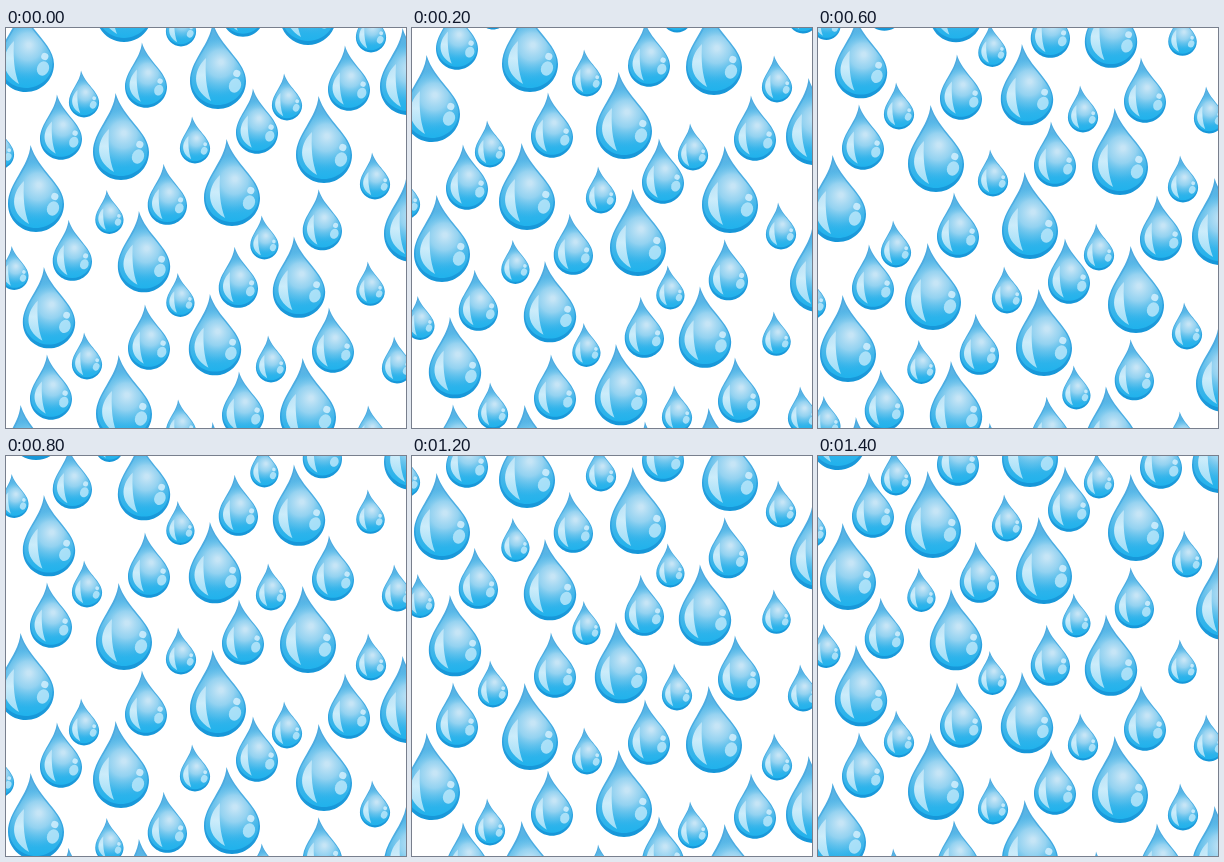
An HTML page with a canvas for the animation above (1.6 s loop, 400 by 400 pixels).

```html
<!DOCTYPE html>
<html lang="en">
<head>
<meta charset="utf-8">
<title>Falling drops</title>
<style>
  html, body { margin: 0; width: 100%; height: 100%; overflow: hidden; background: #fff; }
  canvas { display: block; width: 400px; height: 400px; }
</style>
</head>
<body>
<canvas id="stage" width="400" height="400"></canvas>
<script>
const SIZE = 400, STEP_MS = 200, STEPS = 8;
const UNIT_H = 87;
const ctx = document.getElementById('stage').getContext('2d');

// Every cluster is a large, a medium and a small drop in one fixed arrangement.
const cluster = [
  { dx: 0, dy: 0, size: 1 },
  { dx: 25, dy: -50.5, size: 0.75 },
  { dx: -37, dy: -22.5, size: 0.54 }
];

// Each pair of points is [x, y] of the large drop's tip axis.
const layers = [
  { scale: 1, at: [[20, 377], [212, 394], [402, 400], [118, 327], [302, 330], [428, 331],
                   [30, 117], [226, 111], [406, 147], [115, 65], [318, 68]] },
  { scale: 0.935, at: [[43, 239], [209, 266], [138, 183], [293, 208.5]] }
];

const drops = layers.flatMap(({ scale, at }) => at.flatMap(([x, y]) =>
  cluster.map(({ dx, dy, size }) =>
    ({ x: x + dx * scale, y: y + dy * scale, scale: size * scale }))));
drops.push({ x: 364.5, y: 233.5, scale: 0.51 });

const body = new Path2D('M-5.5 0C-7 22-28 38-28 59C-28 75-15 87 0 87C15 87 28 75 28 59C28 39 2 25-5.5 0Z');
const inner = new Path2D('M-5 5C-7 25-26.5 39-26.5 58C-26.5 73-13 83 0 83C13 83 26.5 73 26.5 58C26.5 41 3 27-5 5Z');
const shine = new Path2D('M-12 36C-23 46-29 66-7 79C-12 66-13 52-12 36Z');

function withStops(gradient, stops) {
  for (const [at, color] of stops) gradient.addColorStop(at, color);
  return gradient;
}

const rim = withStops(ctx.createLinearGradient(0, 0, 0, UNIT_H), [
  [0, '#4aa8df'], [0.4, '#4caee3'], [0.7, '#2aa0df'], [1, '#1496d8']
]);
const fill = withStops(ctx.createLinearGradient(0, 5, 0, 83), [
  [0, '#58b2e3'], [0.45, '#5cb9e8'], [0.75, '#3ab5ea'], [1, '#20b2ec']
]);
const glow = withStops(ctx.createRadialGradient(3, 40, 2, 1, 44, 31), [
  [0, 'rgba(198,229,246,1)'], [0.4, 'rgba(160,215,242,.85)'],
  [0.75, 'rgba(104,196,237,.45)'], [1, 'rgba(60,180,235,0)']
]);
const gloss = withStops(ctx.createLinearGradient(0, 36, 0, 79), [
  [0, 'rgba(220,241,251,.6)'], [0.4, 'rgba(215,241,252,.9)'], [1, 'rgba(185,232,251,.8)']
]);

function paint(path, style) {
  ctx.fillStyle = style;
  ctx.fill(path);
}

function spot(x, y, rx, ry, style) {
  ctx.beginPath();
  ctx.ellipse(x, y, rx, ry, 0.4, 0, Math.PI * 2);
  ctx.fillStyle = style;
  ctx.fill();
}

function drawDrop(x, y, scale) {
  ctx.save();
  ctx.translate(x, y);
  ctx.scale(scale, scale);
  paint(body, rim);
  paint(inner, fill);
  paint(inner, glow);
  paint(shine, gloss);
  spot(18.8, 51.5, 3.6, 3.6, 'rgba(205,236,252,.9)');
  spot(17, 63.5, 6, 7.3, 'rgba(185,230,250,.85)');
  ctx.restore();
}

function render(step) {
  const shift = step * SIZE / STEPS;
  ctx.fillStyle = '#fff';
  ctx.fillRect(0, 0, SIZE, SIZE);
  for (const { x, y, scale } of drops) {
    const top = (y + shift + SIZE) % SIZE;
    drawDrop(x, top, scale);
    drawDrop(x, top - SIZE, scale);
  }
}

let start = null, shown = 0;
function tick(now) {
  if (start === null) start = now;
  const step = Math.floor((now - start) / STEP_MS) % STEPS;
  if (step !== shown) render(shown = step);
  requestAnimationFrame(tick);
}

render(0);
requestAnimationFrame(tick);
</script>
</body>
</html>
```
